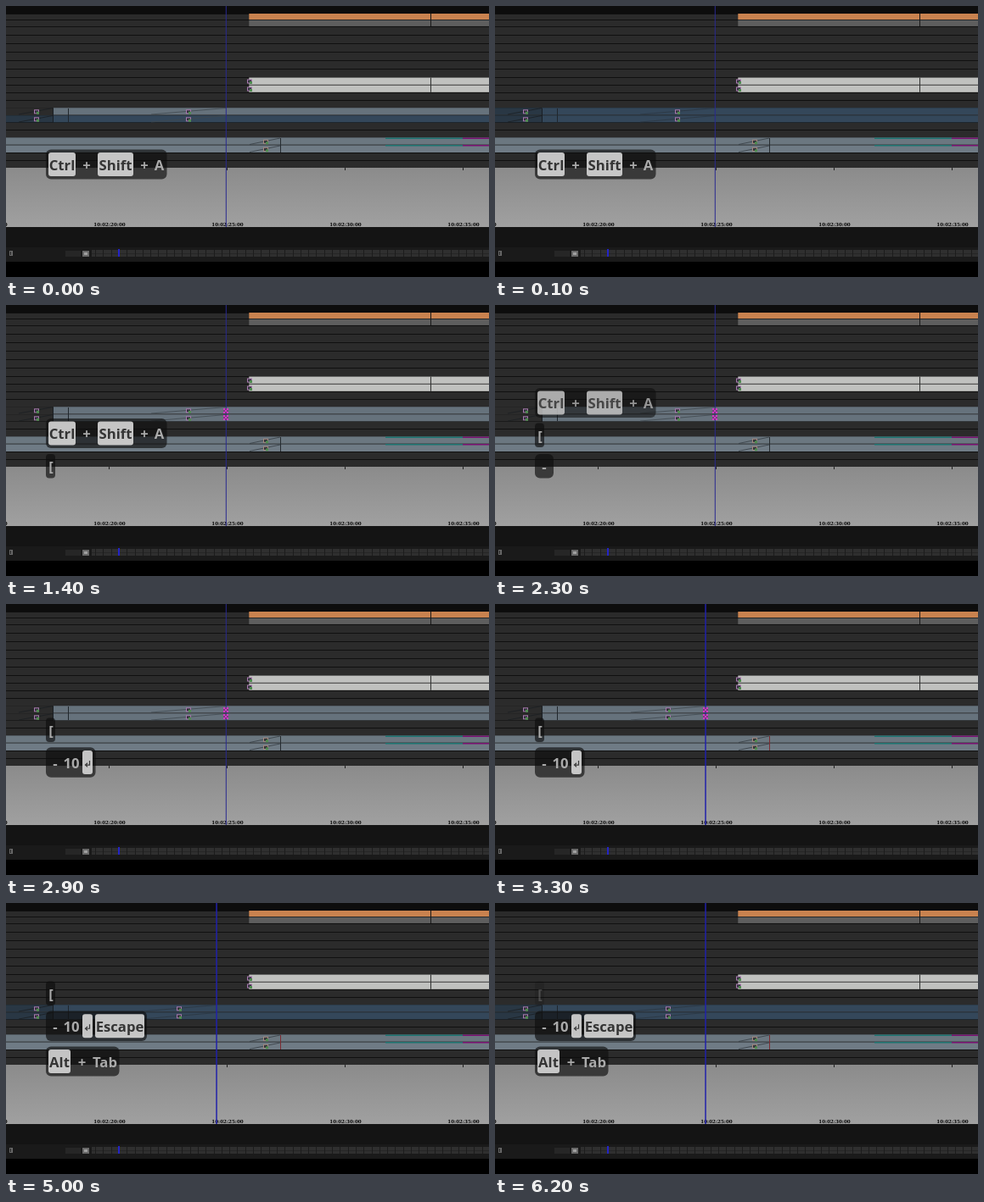
Animation of 569 by 320 pixels, one loop 6.3 s. Source, as an HTML page with a canvas:

```html
<!DOCTYPE html>
<html lang="en">
<head>
<meta charset="utf-8">
<title>Timeline shortcuts</title>
<style>
html, body { margin: 0; width: 100%; height: 100%; overflow: hidden; background: #0d0d0d; }
canvas { display: block; width: 569px; height: 320px; }
</style>
</head>
<body>
<canvas id="stage"></canvas>
<script>
const W = 569, H = 320, LOOP = 6300;
const canvas = document.getElementById('stage');
const ratio = window.devicePixelRatio || 1;
canvas.width = W * ratio;
canvas.height = H * ratio;
const ctx = canvas.getContext('2d');
ctx.scale(ratio, ratio);

const KEY_FONT = '700 16.7px "Open Sans", "Noto Sans", sans-serif';
const CODE_FONT = 'bold 5.6px "DejaVu Serif", "Noto Serif", serif';
const ROW = '#2b2b2b';

function rect(x, y, w, h, color) {
  ctx.fillStyle = color;
  ctx.fillRect(x, y, w, h);
}

function round(x, y, w, h, r, color) {
  ctx.fillStyle = color;
  ctx.beginPath();
  ctx.roundRect(x, y, w, h, r);
  ctx.fill();
}

function line(x1, y1, x2, y2, color, width = 1) {
  ctx.strokeStyle = color;
  ctx.lineWidth = width;
  ctx.beginPath();
  ctx.moveTo(x1, y1);
  ctx.lineTo(x2, y2);
  ctx.stroke();
}

function icon(x, y, edge = '#a878ae') {
  rect(x - 3, y - 2.5, 6, 5, edge);
  rect(x - 2, y - 1.5, 4, 3, '#30333a');
  rect(x, y, 3, 3, '#4f8c50');
}

// A two-row dissolve: sloped line and effect icon in each row
function dissolve(x1, x2, top, iconX, color, edge) {
  for (const y of [top, top + 9]) {
    line(x1, y + 8, x2, y + 0.5, color, 0.8);
    icon(iconX, y + 4.8, edge);
  }
}

function rows() {
  rect(0, 0, W, H, '#0d0d0d');
  rect(0, 9, W, 182, ROW);
  for (const y of [9, 16, 24, 34, 44, 54, 64, 74, 84, 93, 102, 111, 120, 129, 137, 146, 155, 164, 173, 182]) {
    rect(0, y, W, 1, '#101010');
  }
  rect(286.3, 9, 283, 7, '#c9824f');
  rect(286.3, 16.7, 283, 7.2, '#5e5e5e');
  rect(286.3, 84.5, 283, 8.3, '#c0c1bf');
  rect(286.3, 93.6, 283, 8.2, '#c0c1bf');
  rect(500, 9, 1, 15, '#181818');
  rect(500, 84.5, 1, 17.3, '#303030');
  icon(287, 89);
  icon(287, 98);
}

function upperTrack(t, shift) {
  const dark = t >= 3600 || (t >= 100 && t < 1400);
  for (let i = 0; i < 2; i++) {
    const y = i ? 129.2 : 120.2;
    const blue = dark || (t < 100 && i === 1);
    rect(0, y, 56, 8.2, blue ? '#293744' : ROW);
    rect(56, y, W - 56, 8.2, blue ? '#34475a' : '#66727c');
  }
  rect(55, 121, 1, 16, '#1a1f24');
  rect(73, 121, 1, 16, '#20272d');
  dissolve(15, 55, 120, 36, '#1b1f22');
  dissolve(171 - shift, 259 - shift, 120, 215 - shift, dark ? '#2b3642' : '#3f484f');
  return dark;
}

function lowerTrack(t) {
  rect(0, 155.3, W, 8.3, '#6b7780');
  rect(0, 164.4, W, 8.6, '#6f7b85');
  dissolve(287, 323, 155.5, 306, '#353d43', '#a68a80');
  rect(323, 156, 1, 17, t >= 3300 ? '#7c2c32' : '#252b30');
  for (const y of [155.5, 164]) {
    rect(447, y, 91, 1.5, '#1d7470');
    rect(538, y, 31, 1.5, '#791070');
  }
}

function ruler() {
  const shade = ctx.createLinearGradient(0, 191, 0, 261);
  shade.addColorStop(0, '#8b8b8b');
  shade.addColorStop(1, '#a0a0a0');
  rect(0, 191, W, 70, shade);
  ctx.font = CODE_FONT;
  ctx.textAlign = 'center';
  for (let i = 0; i < 5; i++) {
    const x = -17 + 139 * i;
    rect(x - 1, 191, 1, 3, '#202020');
    ctx.fillStyle = '#080808';
    ctx.fillText('10:02:' + (15 + 5 * i) + ':00', x, 260.2);
  }
  rect(0, 261, W, 24, '#141414');
  rect(0, 285, W, 17, '#1a1a1a');
  rect(0, 302, W, 18, '#000');
}

function overview() {
  rect(4, 289, 4, 6, '#686868');
  rect(5, 290, 1, 4, '#222');
  rect(70, 289, 18, 7, '#262626');
  rect(90, 289, 8, 7, '#686868');
  rect(92, 291, 4, 3, '#a0a0a0');
  rect(101, 288, 468, 8, '#2f2f2f');
  rect(101, 292, 468, 1, '#262626');
  for (let x = 105; x < W; x += 9.3) rect(Math.round(x), 288, 1, 8, '#1c1c1c');
  rect(132, 287, 2, 9, '#2424c8');
}

function playhead(x, bright) {
  if (bright) rect(x - 0.7, 0, 1.5, 261, '#2222aa');
  else rect(x - 0.2, 0, 1, 261, '#2a2a90');
}

// Checkered trim rollers, one in each row
function handles(x) {
  for (const top of [122, 130]) {
    for (let i = 0; i < 9; i++) {
      const color = i % 2 ? '#77407c' : '#d236ca';
      rect(x - 3 + 2 * (i % 3), top + 2 * Math.floor(i / 3), 2, 2, color);
    }
  }
}

function box(y, w, h, alpha, draw) {
  if (alpha <= 0) return;
  ctx.save();
  ctx.globalAlpha = alpha;
  round(47, y, w, h, w < 15 ? 4 : 6, 'rgba(14,14,14,.66)');
  ctx.font = KEY_FONT;
  ctx.textAlign = 'center';
  draw(y + h / 2);
  ctx.restore();
}

function label(text, x, mid, color = '#aaa') {
  ctx.fillStyle = color;
  ctx.fillText(text, x, mid + 6.8);
}

function keycap(text, x, w, mid) {
  round(x, mid - 14, w, 28, 3, 'rgba(212,212,212,.92)');
  if (text) label(text, x + w / 2, mid, '#343434');
}

function enterKey(mid) {
  keycap('', 90, 12, mid);
  ctx.strokeStyle = '#383838';
  ctx.lineWidth = 1.2;
  ctx.beginPath();
  ctx.moveTo(98.5, mid - 2);
  ctx.lineTo(98.5, mid + 3);
  ctx.lineTo(93.5, mid + 3);
  ctx.moveTo(96, mid + 0.7);
  ctx.lineTo(93.5, mid + 3);
  ctx.lineTo(96, mid + 5.3);
  ctx.stroke();
}

function selectKeys(y, alpha = 1) {
  box(y, 142.5, 35, alpha, mid => {
    keycap('Ctrl', 50, 32, mid);
    label('+', 95, mid);
    keycap('Shift', 108, 42, mid);
    label('+', 163, mid);
    label('A', 180.5, mid);
  });
}

function bracket(y, alpha = 1) {
  box(y, 11, 28.5, alpha, mid => label('[', 53, mid));
}

function trimKeys(y, t) {
  const digits = t < 2500 ? '' : t < 2600 ? '1' : '10';
  const enter = t >= 2900, escape = t >= 3600;
  const w = escape ? 119 : enter ? 58.5 : 22 + 11 * digits.length;
  box(y, w, enter ? 35.5 : 28.5, 1, mid => {
    label('-', 58, mid);
    ctx.textAlign = 'left';
    label(digits, 67.5, mid);
    ctx.textAlign = 'center';
    if (enter) enterKey(mid);
    if (escape) keycap('Escape', 105, 58, mid);
  });
}

function keys(t) {
  if (t < 1000) {
    selectKeys(169.5);
  } else if (t < 2300) {
    selectKeys(134);
    bracket(176);
  } else if (t < 2900) {
    const step = Math.max(0, Math.floor((t - 2400) / 100));
    selectKeys(98, 0.85 - 0.19 * step);
    bracket(139.5);
    trimKeys(176, t);
  } else if (t < 5000) {
    bracket(134.5);
    trimKeys(169.3, t);
  } else {
    bracket(92.5, t < 6200 ? 1 : 0.3);
    trimKeys(127.5, t);
    box(169.5, 86.5, 35, 1, mid => {
      keycap('Alt', 50, 26, mid);
      label('+', 89.5, mid);
      label('Tab', 116.5, mid);
    });
  }
}

function draw(t) {
  const shift = t >= 3200 ? 11 : 0;
  rows();
  const dark = upperTrack(t, shift);
  lowerTrack(t);
  ruler();
  overview();
  playhead(259 - shift, shift > 0);
  if (!dark && t >= 1400) handles(259 - shift);
  keys(t);
}

const start = performance.now();
function frame() {
  draw((performance.now() - start) % LOOP);
  requestAnimationFrame(frame);
}
frame();
</script>
</body>
</html>
```
